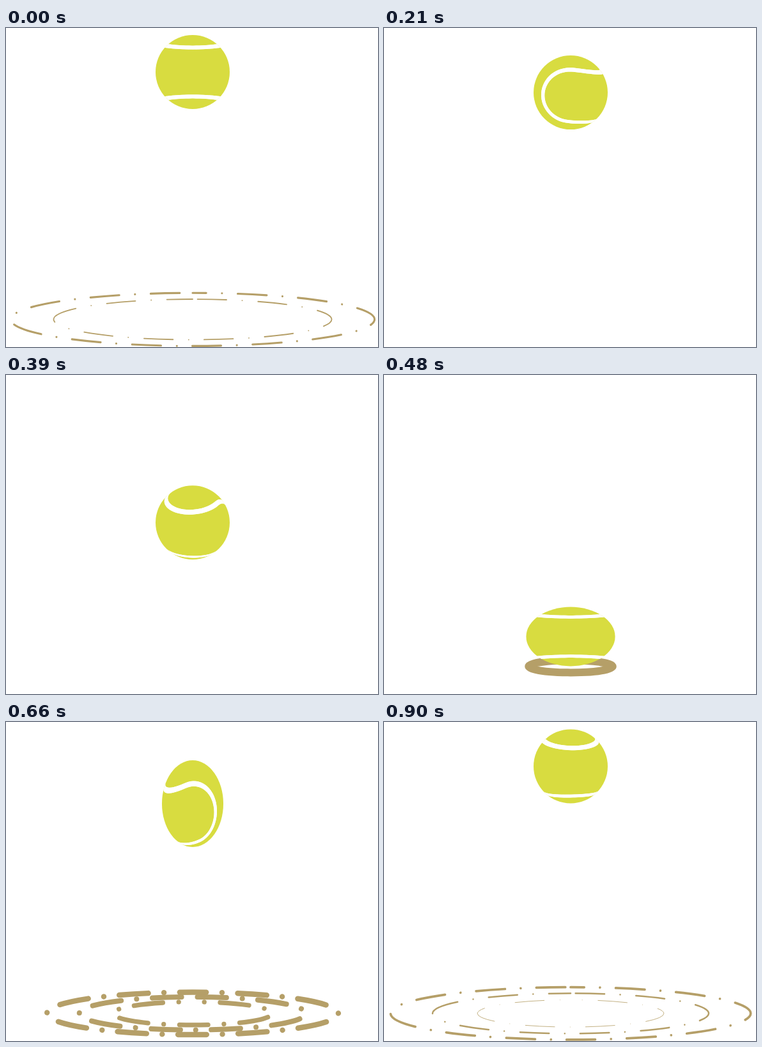
Write an HTML page with a canvas that moves like this. It is 582x500 px and loops after 930 ms.

```html
<!DOCTYPE html>
<html lang="en">
<head>
<meta charset="utf-8">
<title>Bouncing tennis ball</title>
<style>
  html, body { margin: 0; width: 582px; height: 500px; overflow: hidden; background: #fff; }
  canvas { display: block; }
</style>
</head>
<body>
<canvas id="stage" width="582" height="500"></canvas>
<script>
const ctx = document.getElementById('stage').getContext('2d');
const { PI, sin, cos, min, max, hypot } = Math;
const LOOP = 930, STEP = 30, IMPACT = 480;
const CX = 292, TOP = 69, DROP = 341, RADIUS = 58;
const PERIOD = 94.2, GAP = 24.5;

const rings = [
  { radius: 291, start: 470, end: 1090, dot: 46 },
  { radius: 219, start: 480, end: 1010, dot: 77.5 },
  { radius: 146, start: 480, end: 930, dot: 18.5 }
];

const clamp = v => min(1, max(0, v));

// Cubic Bezier ease-in with control points (a, 0) and (b, 0)
function easeIn(x, a, b) {
  let lo = 0, hi = 1;
  for (let i = 0; i < 24; i++) {
    const s = (lo + hi) / 2, r = 1 - s;
    if (3 * r * r * s * a + 3 * r * s * s * b + s ** 3 < x) lo = s;
    else hi = s;
  }
  return lo ** 3;
}

// Seam on the unit sphere: four near-semicircles, t from 0 to 4, waist facing +z
function seamPoint(t) {
  const lobe = Math.floor(t), phi = PI * (t - lobe), turn = lobe * PI / 2;
  const h = Math.SQRT1_2 - .045 * sin(phi) ** 2, r = Math.sqrt(1 - h * h);
  const x = r * cos(phi), z = r * sin(phi);
  return [
    x * cos(turn) - h * sin(turn),
    x * sin(turn) + h * cos(turn),
    lobe % 2 ? -z : z
  ];
}

function seamEdges(t) {
  const p = seamPoint(t), q = seamPoint(t + .001);
  const n = [p[1] * q[2] - p[2] * q[1], p[2] * q[0] - p[0] * q[2], p[0] * q[1] - p[1] * q[0]];
  const k = .068 / hypot(...n);
  return [-k, k].map(w => p.map((c, i) => c + w * n[i]));
}

const SEGMENTS = 240;
const seam = Array.from({ length: SEGMENTS }, (_, i) => seamEdges(i * 4 / SEGMENTS));

function rotate([x, y, z], pitch, yaw) {
  const depth = z * cos(yaw) - x * sin(yaw);
  return [
    x * cos(yaw) + z * sin(yaw),
    y * cos(pitch) + depth * sin(pitch),
    depth * cos(pitch) - y * sin(pitch)
  ];
}

function squash(t) {
  const blend = (from, to, t0, t1) => from + (to - from) * (1 - cos(PI * (t - t0) / (t1 - t0))) / 2;
  if (t < 450) return 0;
  if (t < IMPACT) return blend(0, .2, 450, IMPACT);
  if (t < 600) return blend(.2, -.19, IMPACT, 600);
  return t < 900 ? blend(-.19, 0, 600, 900) : 0;
}

function drawRing({ radius, start, end, dot }, t) {
  const time = t < start ? t + LOOP : t;
  const p = (time - start) / (end - start);
  if (p <= 0 || p >= 1) return;
  const r = radius * (1 - easeIn(1 - p, .155, 1));
  const gap = GAP * clamp((time - IMPACT) / 120), dash = PERIOD - 2 * gap;
  ctx.lineWidth = 12.2 * (1 - p);
  ctx.setLineDash([dash, gap, .01, gap]);
  ctx.lineDashOffset = dash + gap - dot;
  ctx.beginPath();
  ctx.ellipse(CX, 456.8, r, r * .146, 0, -PI / 2, PI * 1.5);
  ctx.stroke();
}

function drawBall(t) {
  const falling = t < IMPACT;
  const fall = falling ? easeIn(t / IMPACT, .191, .786)
                       : easeIn((LOOP - t) / (LOOP - IMPACT), .154, .913);
  const turn = PI * clamp(falling ? t / 455 : (t - IMPACT) / (LOOP - IMPACT));
  const k = squash(t);

  ctx.save();
  ctx.translate(CX, TOP + DROP * fall);
  ctx.scale(RADIUS * (1 + k), -RADIUS * (1 - k));
  ctx.fillStyle = '#d8dc40';
  ctx.beginPath();
  ctx.arc(0, 0, 1, 0, 2 * PI);
  ctx.fill();

  ctx.fillStyle = '#fff';
  const edges = seam.map(pair => pair.map(v => rotate(v, turn, falling ? -turn : turn)));
  edges.forEach(([a, b], i) => {
    const [c, d] = edges[(i + 2) % SEGMENTS]; // overlap hides the joints
    if (a[2] + b[2] < 0) return;
    ctx.beginPath();
    for (const [x, y] of [a, b, d, c]) ctx.lineTo(x, y);
    ctx.fill();
  });
  ctx.restore();
}

function draw(now) {
  const t = Math.floor(now / STEP) * STEP % LOOP;
  ctx.clearRect(0, 0, 582, 500);
  ctx.strokeStyle = '#b59f68';
  ctx.lineCap = 'round';
  rings.forEach(ring => drawRing(ring, t));
  drawBall(t);
}

const origin = performance.now();
function loop() {
  draw(performance.now() - origin);
  requestAnimationFrame(loop);
}
loop();
</script>
</body>
</html>
```
